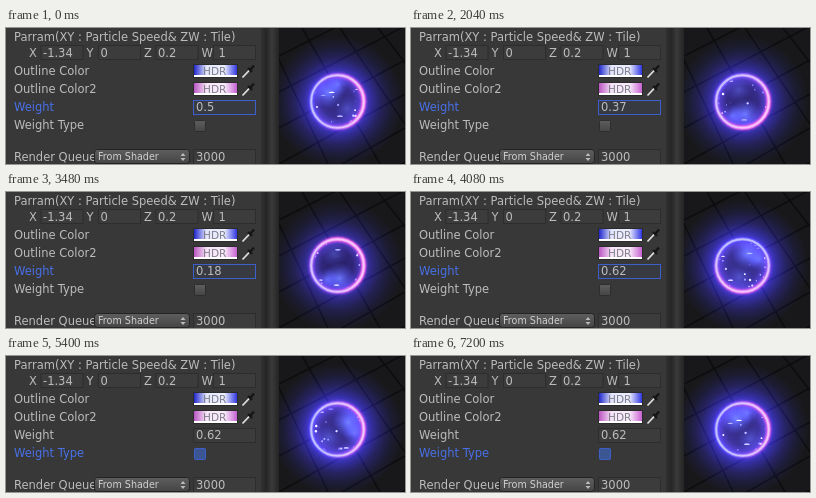
Animation of 399 by 136 pixels, one loop 7.26 s. Source, as an HTML page with a canvas:

```html
<!DOCTYPE html>
<html lang="en">
<head>
<meta charset="utf-8">
<title>Outline weight</title>
<style>
html, body { margin: 0; width: 100%; height: 100%; overflow: hidden; background: #383838; }
svg, canvas { position: absolute; left: 0; top: 0; }
canvas { left: 273px; }
text { font: 11.5px "DejaVu Sans", sans-serif; fill: #bcbcbc; white-space: pre; }
.field { fill: #3c3c3c; stroke: #2d2d2d; }
.active { fill: #4870e8; }
.field.focus { fill: #383a42; stroke: #3c5fcc; }
#box { fill: url(#button); }
#box.focus { fill: #3c5694; }
.small { font-size: 9.6px; fill: #d0d0d0; }
.hdr { font-size: 10.5px; fill: #80808a; }
</style>
</head>
<body>
<svg width="399" height="136">
  <defs>
    <linearGradient id="blue">
      <stop stop-color="#1820c8"/><stop offset=".3" stop-color="#e4e6fd"/>
      <stop offset=".7" stop-color="#eceeff"/><stop offset="1" stop-color="#2830e0"/>
    </linearGradient>
    <linearGradient id="pink">
      <stop stop-color="#b850c0"/><stop offset=".3" stop-color="#f7e4f8"/>
      <stop offset=".7" stop-color="#faecfb"/><stop offset="1" stop-color="#c45cd0"/>
    </linearGradient>
    <linearGradient id="button" x2="0" y2="1">
      <stop stop-color="#5e5e5e"/><stop offset="1" stop-color="#454545"/>
    </linearGradient>
    <linearGradient id="edge">
      <stop stop-color="#303030"/><stop offset=".3" stop-color="#262626"/>
      <stop offset=".6" stop-color="#3a3a3a"/><stop offset="1" stop-color="#242424"/>
    </linearGradient>
    <g id="picker">
      <path d="M236.500 49.500l8-8.500" stroke="#e0e0e0" stroke-width="1.800"/>
      <path d="M242 40l4 4M244.500 41.500l3.500-4" stroke="#151515" stroke-width="2.400"/>
    </g>
  </defs>
  <text x="8" y="13">Parram(XY : Particle Speed&amp; ZW : Tile)</text>
  <g id="vector"></g>

  <text x="8" y="47">Outline Color</text>
  <text x="8" y="65">Outline Color2</text>
  <g id="swatches"></g>
  <use href="#picker"/><use href="#picker" y="18"/>

  <text id="weightLabel" x="8" y="83">Weight</text>
  <rect id="weightField" class="field" x="187.500" y="72.500" width="62" height="14"/>
  <text id="weight" x="190" y="83"></text>

  <text id="typeLabel" x="8" y="101">Weight Type</text>
  <rect id="box" class="field" x="188.500" y="92.500" width="11" height="11" rx="1"/>
  <path id="tick" d="M190.500 97l3 4 6-8.500" fill="none" stroke="#f2f2f2" stroke-width="2"/>

  <text x="8" y="133">Render Queue</text>
  <rect x="88.500" y="121.500" width="95" height="14" rx="3" fill="url(#button)" stroke="#232323"/>
  <text class="small" x="92" y="132">From Shader</text>
  <path d="M174.500 128l2.500-3 2.500 3zM174.500 130l2.500 3 2.500-3z" fill="#bbb"/>
  <rect class="field" x="187.500" y="121.500" width="62" height="16"/>
  <text x="190" y="133">3000</text>
  <path d="M255 0h18v136h-18z" fill="url(#edge)"/>
</svg>
<canvas id="scene" width="126" height="136"></canvas>
<script>
const $ = id => document.getElementById(id);
const ctx = $('scene').getContext('2d');
const LOOP = 7260, STEP = 60, LEFT = 273, CX = 331.5, CY = 73.5, R = 26.3, TAU = Math.PI * 2;
const PINK = [235, 85, 235], BLUE = [76, 66, 255];
const weightKeys = [[0, .5], [900, .5], [1380, .26], [1680, .1], [2100, .42], [2700, .91],
  [2880, 1], [3120, .66], [3480, .18], [3720, .08], [4020, .62], [LOOP, .62]];
const toggles = [4440, 5280, 5880, 6480];

$('vector').innerHTML = [['X', '-1.34'], ['Y', '0'], ['Z', '0.2'], ['W', '1']].map(([name, value], i) =>
  `<g transform="translate(${23 + i * 57.5} 0)"><rect class="field" x="12" y="17.5" width="42" height="14"/>
   <text y="29">${name}</text><text x="${name === 'W' ? 17 : 14}" y="29">${value}</text></g>`).join('');
$('swatches').innerHTML = ['blue', 'pink'].map((name, i) =>
  `<g transform="translate(0 ${i * 18})"><rect x="187.5" y="36.5" width="44" height="13" fill="url(#${name})" stroke="#2b2b2b"/>
   <path d="M188 47h43v2h-43z" fill="#fff"/><text class="hdr" x="197" y="46.5">HDR</text></g>`).join('');

function random(seed) {
  const v = Math.sin(seed * 91.73) * 43758.545;
  return v - Math.floor(v);
}
const sparks = Array.from({ length: 46 }, (_, i) => ({
  lon: random(i + 1) * TAU, lat: (random(i + 50) - .5) * 2.4,
  phase: random(i + 100) * TAU, size: .5 + random(i + 150) * .8, long: random(i + 200) < .25
}));

function weightAt(t) {
  const i = weightKeys.findIndex(key => key[0] > t);
  const [t0, a] = weightKeys[i - 1], [t1, b] = weightKeys[i];
  return a + (b - a) * (t - t0) / (t1 - t0);
}

function ringColor(mix, light) {
  const m = Math.max(0, Math.min(1, mix));
  return `rgb(${PINK.map((p, i) => {
    const c = p + (BLUE[i] - p) * m;
    return Math.round(c + (255 - c) * light);
  })})`;
}

function line(x1, y1, x2, y2) {
  ctx.beginPath();
  ctx.moveTo(x1, y1);
  ctx.lineTo(x2, y2);
  ctx.stroke();
}

function disc(x, y, r, stops) {
  const g = ctx.createRadialGradient(x, y, 0, x, y, r);
  stops.forEach(([at, color]) => g.addColorStop(at, color));
  ctx.fillStyle = g;
  ctx.beginPath();
  ctx.arc(x, y, r, 0, TAU);
  ctx.fill();
}

function drawFloor() {
  ctx.fillStyle = '#18181a';
  ctx.fillRect(LEFT, 0, 126, 136);
  ctx.strokeStyle = '#0d0d0f';
  ctx.lineWidth = 1.6;
  for (let i = 0; i < 6; i++) {
    line(LEFT, 28 + i * 36, 399, -36 + i * 34);
    line(220 + i * 38, 0, 270 + i * 52, 136);
  }
}

function drawGlow(weight, vertical) {
  const power = vertical ? .75 : .6 + .4 * weight;
  const color = (r, g, b) => `rgb(${r * power},${g * power},${b * power})`;
  ctx.globalCompositeOperation = 'lighter';
  disc(CX, CY, 66, [[0, color(50, 38, 210)], [.42, color(56, 40, 225)], [.52, color(32, 26, 155)],
    [.66, color(16, 13, 82)], [.82, color(6, 5, 32)], [1, '#000']]);
  ctx.globalCompositeOperation = 'source-over';
}

function drawInside(t, weight) {
  const turn = t / LOOP * TAU;
  ctx.save();
  ctx.beginPath();
  ctx.arc(CX, CY, R, 0, TAU);
  ctx.clip();
  disc(CX, CY, R, [[0, '#211a52'], [.6, '#2b216e'], [.85, '#4432a8'], [1, '#6a4ce0']]);
  ctx.globalCompositeOperation = 'lighter';
  disc(CX, CY, R, [[0, `rgba(70,70,180,${weight * .4})`], [1, `rgba(70,70,180,${weight * .4})`]]);
  const angle = -2.36 - turn * 5;
  for (const [offset, reach, size, alpha] of [[0, 13, 16, .6], [.8, 17, 11, .4], [3, 12, 13, .25]])
    disc(CX + reach * Math.cos(angle + offset), CY + reach * Math.sin(angle + offset), size,
      [[0, `rgba(100,135,225,${alpha})`], [1, 'rgba(60,70,200,0)']]);
  for (const s of sparks) {
    const lon = s.lon - turn * 2, depth = Math.cos(lon);
    if (depth < -.2) continue;
    const glow = Math.max(0, .35 + .65 * Math.sin(turn * 7 + s.phase));
    const x = CX + R * .93 * Math.sin(lon) * Math.cos(s.lat);
    const y = CY + R * .93 * Math.sin(s.lat);
    ctx.fillStyle = `rgba(185,195,255,${glow})`;
    ctx.beginPath();
    ctx.ellipse(x, y, s.long ? 1 + 2 * Math.abs(depth) : s.size, s.long ? .6 : s.size, 0, 0, TAU);
    ctx.fill();
  }
  ctx.restore();
}

function drawRing(weight, vertical, t) {
  const swirl = Math.PI + t / LOOP * TAU * 4;
  const gradient = light => {
    const g = ctx.createConicGradient(0, CX, CY);
    for (let i = 0; i <= 24; i++) {
      const a = i / 24 * TAU;
      const mix = vertical ? weight + .75 * Math.sin(a) - .1 * Math.cos(a)
                           : weight + .5 * Math.cos(a - swirl);
      g.addColorStop(i / 24, ringColor(mix, light));
    }
    return g;
  };
  [[8, .2, 0], [5.5, .5, 0], [3.8, 1, .2], [2, .9, .72]].forEach(([width, alpha, light]) => {
    ctx.globalAlpha = alpha;
    ctx.lineWidth = width;
    ctx.strokeStyle = gradient(light);
    ctx.beginPath();
    ctx.arc(CX, CY, R, 0, TAU);
    ctx.stroke();
  });
  ctx.globalAlpha = 1;
}

function drawScene(t, weight, vertical) {
  ctx.setTransform(1, 0, 0, 1, -LEFT, 0);
  drawFloor();
  drawGlow(weight, vertical);
  drawInside(t, weight);
  drawRing(weight, vertical, t);
}

function drawPanel(t, weight, checked) {
  const onType = t >= toggles[0];
  $('weight').textContent = +weight.toFixed(2);
  $('weightLabel').classList.toggle('active', !onType);
  $('weightField').classList.toggle('focus', !onType);
  $('typeLabel').classList.toggle('active', onType);
  $('box').classList.toggle('focus', onType);
  $('tick').style.display = checked ? '' : 'none';
}

function frame() {
  const t = Math.floor(performance.now() % LOOP / STEP) * STEP;
  const weight = weightAt(t);
  const checked = toggles.filter(at => at <= t).length % 2 === 1;
  drawPanel(t, weight, checked);
  drawScene(t, weight, checked);
  requestAnimationFrame(frame);
}
frame();
</script>
</body>
</html>
```
